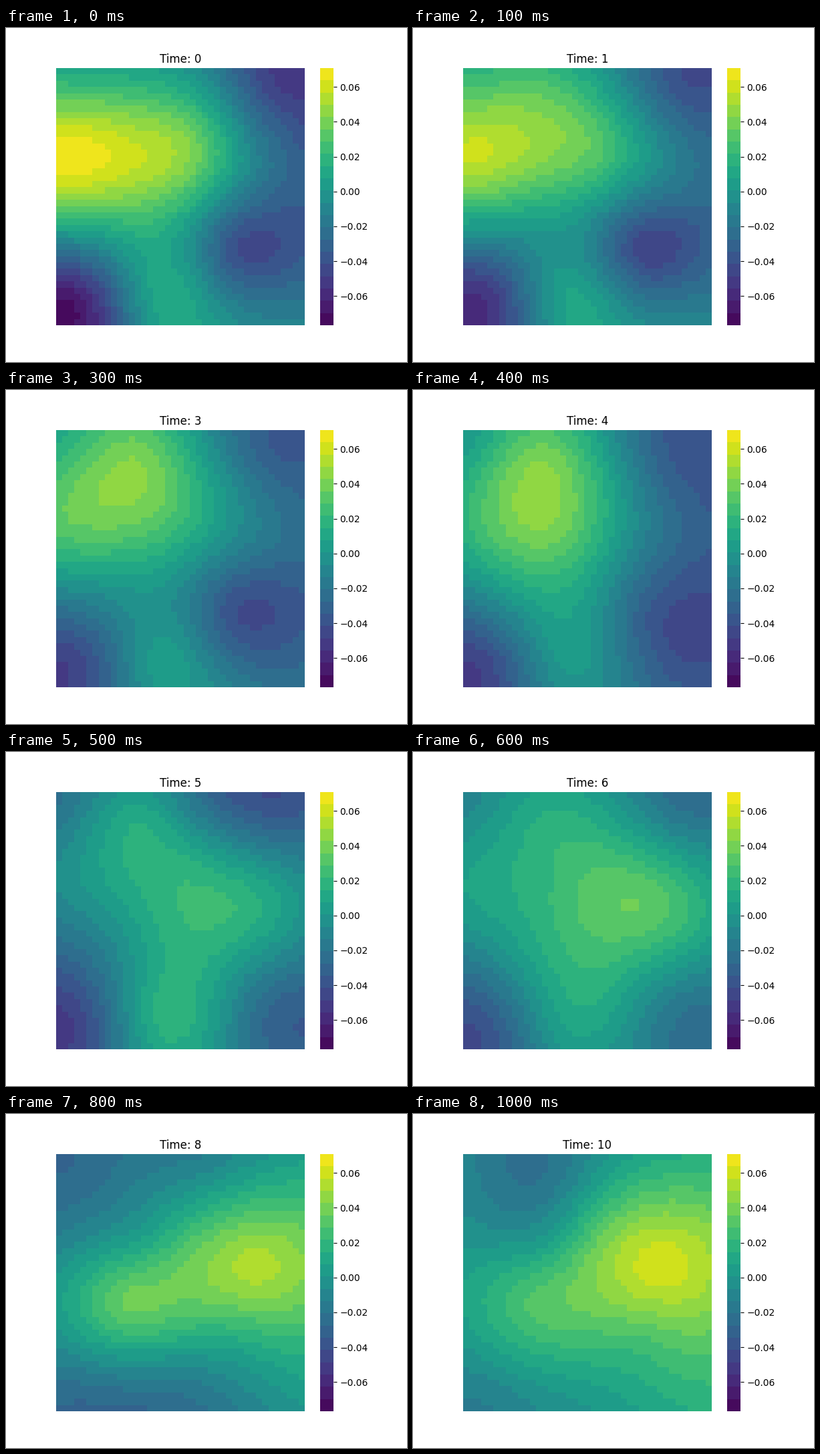
Recreate the animation shown at these times as a matplotlib script. Size 600 by 500 pixels, loop 1100 ms.

```python
import numpy as np
import matplotlib.pyplot as plt
from matplotlib.animation import FuncAnimation
from matplotlib.colors import ListedColormap

W, H, DPI = 600, 500, 100
CELLS = 41
BANDS = 21
VMIN, VMAX = -0.07679, 0.0708
LEFT, RIGHT, TOP, BOTTOM = 75, 447, 60, 445
REACH = 105  # how far one probe shapes the field, in pixels

# Each probe: x, y and its height in thousandths at the key times.
KEY_TIMES = [0, 2, 4, 5, 7, 8, 10]
PROBES = [
    (85, 80, [20, 28, 5, -19, 3, -28, -12]),
    (195, 100, [26, 43, 41, 13, 19, -14, -20]),
    (300, 75, [-6, 0, -4, -24, 26, -10, 5]),
    (395, 85, [-46, -31, -38, -38, -3, 7, 20]),
    (85, 200, [70, 45, 22, -5, 22, -8, 1]),
    (200, 195, [58, 28, 45, 16, 25, 10, 7]),
    (275, 185, [43, 21, 21, 20, 41, 27, 34]),
    (370, 232, [-14, -9, -21, 18, 47, 53, 61]),
    (180, 280, [27, -8, 20, 0, 27, 37, 31]),
    (345, 330, [-41, -51, -32, 0, 18, 17, 30]),
    (110, 410, [-66, -46, -45, -46, -31, -23, -10]),
    (235, 400, [13, 5, 4, 18, 4, -16, 6]),
    (400, 390, [-27, -25, -43, -30, -10, 4, 22]),
]


def kernel(a, b):
    r = np.linalg.norm(a[:, None] - b[None], axis=2) / REACH
    return (1 + r) * np.exp(-r)


def centers(lo, hi):
    return lo + (np.arange(CELLS) + 0.5) * (hi - lo) / CELLS


sites = np.array([p[:2] for p in PROBES], dtype=float)
gx, gy = np.meshgrid(centers(LEFT, RIGHT), centers(TOP, BOTTOM))
cells = np.column_stack([gx.ravel(), gy.ravel()])
spread = kernel(cells, sites) @ np.linalg.inv(kernel(sites, sites))


def field(t):
    heights = [np.interp(t, KEY_TIMES, p[2]) / 1000 for p in PROBES]
    return (spread @ heights).reshape(CELLS, CELLS)


mids = (np.arange(BANDS) + 0.5) / BANDS
cmap = ListedColormap(plt.get_cmap("viridis")(mids))

fig = plt.figure(figsize=(W / DPI, H / DPI), dpi=DPI, facecolor="white")
ax = fig.add_axes([0.125, 0.11, 0.62, 0.77])
mesh = ax.pcolormesh(field(0), cmap=cmap, vmin=VMIN, vmax=VMAX)
ax.set(xlim=(0, CELLS), ylim=(CELLS, 0))
ax.axis("off")
title = ax.set_title("Time: 0")

cax = fig.add_axes([0.78375, 0.11, 19.25 / W, 0.77])
bar = fig.colorbar(mesh, cax=cax)
bar.outline.set_linewidth(0)


def update(t):
    mesh.set_array(field(t))
    title.set_text(f"Time: {t}")
    return mesh, title


anim = FuncAnimation(fig, update, frames=11, interval=100,
                     repeat=True, repeat_delay=0)
plt.show()
```
